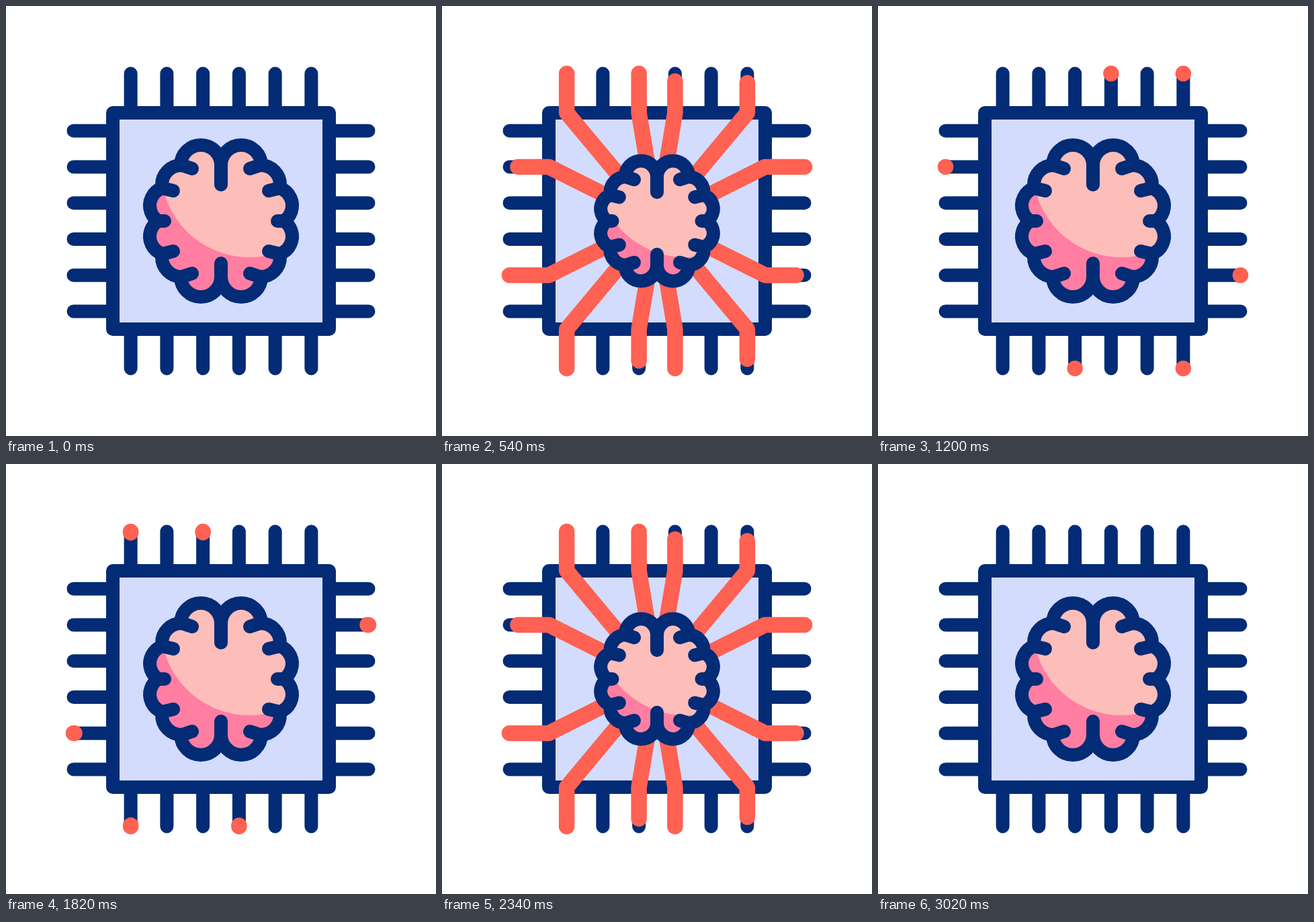
Animation of 640 by 640 pixels, one loop 3200 ms. Source, as an HTML page with a canvas:

```html
<!DOCTYPE html>
<html lang="en">
<head>
<meta charset="utf-8">
<title>Thinking chip</title>
<style>
  html, body { margin: 0; width: 100%; height: 100%; overflow: hidden; background: #fff; }
  canvas { display: block; }
</style>
</head>
<body>
<canvas id="stage" width="640" height="640"></canvas>
<script>
const ctx = document.getElementById('stage').getContext('2d');
const NAVY = '#032b76', PALE = '#d3dcfd', RED = '#ff6152', LIGHT = '#fdbdb9', DARK = '#ff7ea2';

// All coordinates are relative to the centre of the stage.
const MID = 320, PITCH = 53.75, TIP = 219.5, EDGE = 161;
const LOOP = 3200, CYCLE = 1800, ACTIVE = 1220, STEP = 20;
const HALF = 600, TRAVEL = 433, DELAY = 167;

// Pins that carry signals inwards: [slot, side, horizontal?]; the outward ones mirror them.
const SIGNALS = [[-2.5, -1], [-0.5, -1], [-2.5, 1], [0.5, 1], [1.5, -1, true], [-1.5, 1, true]];

const wires = SIGNALS.map(([slot, side, flat]) => {
  const point = d => flat ? [side * d, slot * PITCH] : [slot * PITCH, side * d];
  const bend = point(EDGE);
  return { points: [point(TIP), bend, [0, 0]], length: TIP - EDGE + Math.hypot(...bend) };
});

// One quarter of the brain: lobes as [cx, cy, r], joined at the given points.
const LOBES = [[-30, -83, 30], [-59, -54, 29], [-78.5, -23, 27.5]];
const JOINTS = [[0, -83], [-59.5, -83.5], [-87.6, -48.9], [-93.6, 0]];
const FOLD_TIPS = [[-43, -78], [-71, -45], [-84, 0]];

function addLine(path, from, to) {
  path.moveTo(...from);
  path.lineTo(...to);
}

function quarterEdge() {
  const path = new Path2D();
  LOBES.forEach(([cx, cy, r], i) => {
    const angle = ([x, y]) => Math.atan2(y - cy, x - cx);
    path.arc(cx, cy, r, angle(JOINTS[i]), angle(JOINTS[i + 1]), true);
  });
  return path;
}

const quarterBody = quarterEdge();
quarterBody.lineTo(0, 0);
const quarterLines = quarterEdge();
FOLD_TIPS.forEach((tip, i) => addLine(quarterLines, JOINTS[i + 1], tip));

const body = new Path2D(), lines = new Path2D();
for (const a of [1, -1]) {
  for (const d of [1, -1]) {
    body.addPath(quarterBody, { a, d });
    lines.addPath(quarterLines, { a, d });
  }
}
addLine(lines, [0, -83], [0, -54]);
addLine(lines, [0, 83], [0, 63]);

const chip = new Path2D();
chip.rect(-EDGE, -EDGE, 2 * EDGE, 2 * EDGE);
const pins = new Path2D();
for (let slot = -2.5; slot < 3; slot++) {
  for (const side of [-1, 1]) {
    const p = slot * PITCH;
    addLine(pins, [p, side * TIP], [p, side * EDGE]);
    addLine(pins, [side * TIP, p], [side * EDGE, p]);
  }
}

function ease(p) {
  p = Math.min(1, Math.max(0, p));
  return p * p * (3 - 2 * p);
}

function stroke(path, color, width) {
  ctx.strokeStyle = color;
  ctx.lineWidth = width;
  ctx.stroke(path);
}

// A stretch of wire between its travelling tail and head.
function drawSignal({ points, length }, t, outward) {
  const head = ease(t / TRAVEL) * length;
  const tail = Math.min(ease((t - HALF) / TRAVEL) * length, length - 0.1);
  const path = new Path2D();
  const route = outward ? points.map(([x, y]) => [-x, y]).reverse() : points;
  route.forEach(p => path.lineTo(...p));
  ctx.setLineDash([Math.max(0.1, head - tail), 2000]);
  ctx.lineDashOffset = -tail;
  stroke(path, RED, 23.5);
  ctx.setLineDash([]);
}

function drawBrain(t) {
  const s = 1 - 0.215 * ease(t < HALF ? t / HALF : 2 - t / HALF);
  const scaled = path => {
    const result = new Path2D();
    result.addPath(path, { a: s, d: s });
    return result;
  };
  ctx.save();
  ctx.clip(scaled(body));
  ctx.fillStyle = DARK;
  ctx.fillRect(-MID, -MID, 640, 640);
  ctx.fillStyle = LIGHT;
  ctx.beginPath();
  ctx.arc(42, -77.4, 131.4, 0, 2 * Math.PI);
  ctx.fill();
  ctx.restore();
  stroke(scaled(lines), NAVY, 20);
}

function draw(now) {
  const t = Math.floor(now % LOOP % CYCLE / STEP) * STEP;
  ctx.setTransform(1, 0, 0, 1, MID, MID);
  ctx.lineCap = ctx.lineJoin = 'round';
  ctx.fillStyle = '#fff';
  ctx.fillRect(-MID, -MID, 640, 640);
  stroke(pins, NAVY, 20);
  ctx.fillStyle = PALE;
  ctx.fill(chip);
  stroke(chip, NAVY, 20);
  if (t > 0 && t < ACTIVE) {
    for (const wire of wires) {
      drawSignal(wire, t, false);
      drawSignal(wire, t - DELAY, true);
    }
  }
  drawBrain(t);
}

const start = performance.now();
function tick() {
  draw(performance.now() - start);
  requestAnimationFrame(tick);
}
tick();
</script>
</body>
</html>
```
